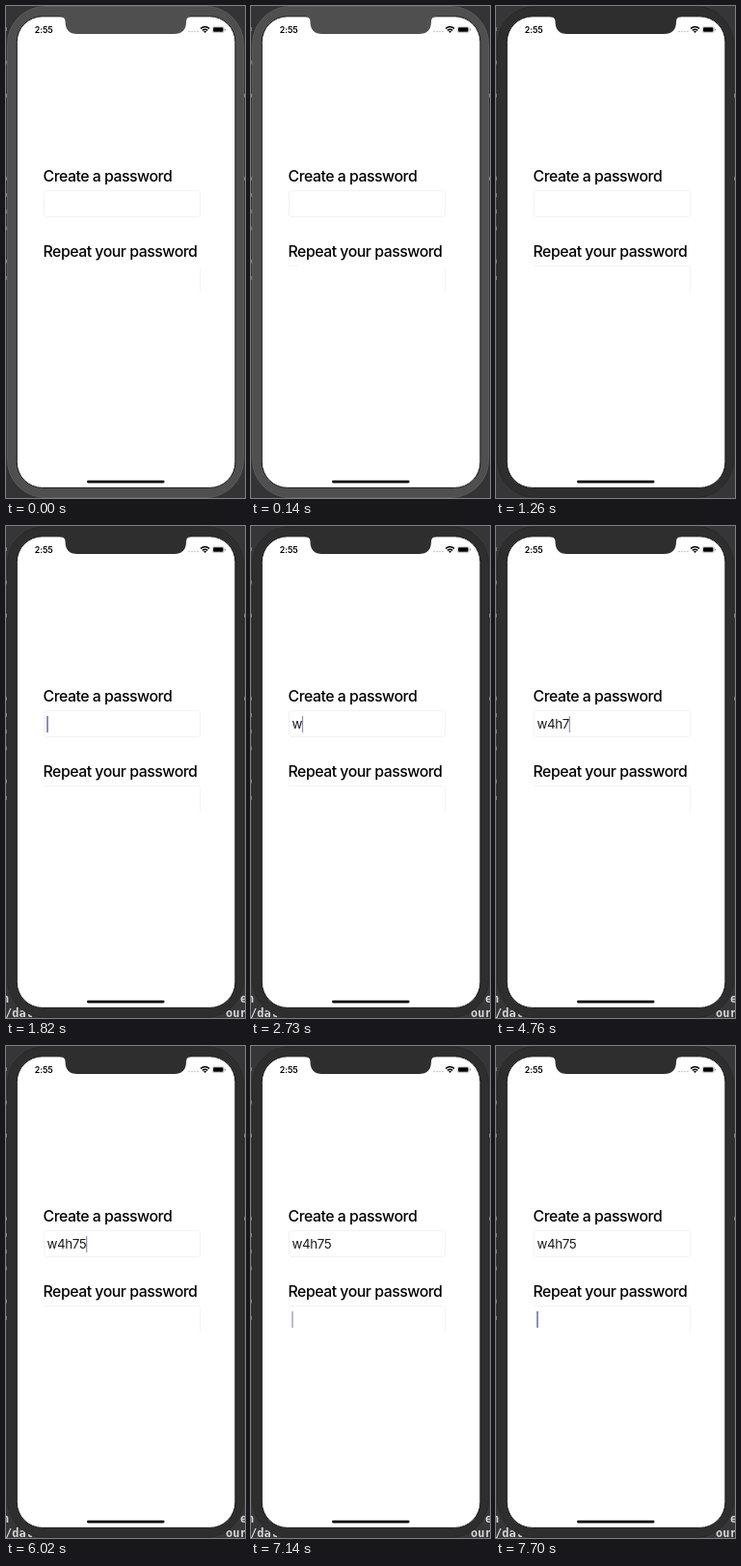
An HTML page that plays this animation: 248 px wide and 510 px high, repeating every 8000 ms.

```html
<!DOCTYPE html>
<html lang="en">
<head>
<meta charset="utf-8">
<title>Password form</title>
<style>
  html, body { margin: 0; width: 100%; height: 100%; overflow: hidden; background: #333336; }
  svg { display: block; width: 248px; height: 510px; }
  text { font-family: Inter, "Liberation Sans", sans-serif; white-space: pre; }
  .label { font-size: 15.8px; font-weight: 500; letter-spacing: -.46px; }
  .entry { font-size: 13.4px; letter-spacing: -.45px; fill: #1c1c1c; }
  .clock { font-size: 8.8px; font-weight: 600; letter-spacing: -.1px; }
  #code text { font: bold 12px "DejaVu Sans Mono", monospace; fill: #d4d4d4; }
  .line { fill: none; stroke: #f2f2f2; }
</style>
</head>
<body>
<svg viewBox="0 0 248 510">
  <rect id="desk" width="248" height="510"/>
  <g id="specks" fill="#777"></g>
  <g id="code">
    <text x="-4" y="494">n</text>
    <text x="243" y="494">e</text>
    <text x="-1" y="509">/dat</text>
    <text x="228" y="509">our</text>
  </g>
  <rect id="body" x="1.5" y=".5" width="245" height="509" rx="39"/>
  <rect x="11.300" y="10.800" width="226.600" height="488.600" rx="26.500" fill="#fff" stroke="#1a1a1a"/>
  <path id="notch" d="M56 10H192V11.300Q187 11.300 187 16Q187 29 174 29H74Q61.500 29 61.500 16Q61.500 11.300 56 11.300Z"/>

  <text class="clock" x="29.800" y="27.500">2:55</text>
  <path d="M190 26.500H200" stroke="#b5b5b5" stroke-width="1.600" stroke-linecap="round" stroke-dasharray="0 3"/>
  <g fill="none" stroke="#000" stroke-width="1.500">
    <path d="M202 23.300Q206.500 19.700 211 23.300"/>
    <path d="M203.800 25.300Q206.500 23.200 209.200 25.300"/>
  </g>
  <path d="M205 26.300Q206.500 25.300 208 26.300L206.500 28Z"/>
  <rect x="214.200" y="21.400" width="12" height="6.200" rx="1.800" fill="#fff" stroke="#aaa" stroke-width=".6"/>
  <rect x="215" y="22.200" width="10.400" height="4.600" rx="1.100"/>
  <rect x="227" y="23.600" width="1" height="2" rx=".5" fill="#999"/>

  <text class="label" x="38.500" y="182">Create a password</text>
  <text class="label" x="38.500" y="260">Repeat your password</text>
  <rect class="line" x="39.500" y="191.500" width="162" height="27" rx="3"/>
  <path class="line" d="M201.500 272V296"/>
  <path id="top" class="line" d="M39.500 269.500H199Q201.500 269.500 201.500 272" pathLength="1"/>
  <text id="entry" class="entry" x="42.500" y="210"></text>
  <rect id="caret" width="1.200" height="17" fill="#43458c"/>
  <rect x="84" y="491.800" width="80.500" height="2.600" rx="1.300"/>
</svg>
<script>
const LOOP = 8000, STEP = 70;
const WORD = "w4h75";
const KEYS = [2100, 2800, 3360, 4130, 4900];
const FOCUS = 1820, NEXT = 6510, DARK = 1260;
const WAKES = [FOCUS, ...KEYS, NEXT];
const FIELD_GAP = 78, LINE_GAP = 17.2;

const $ = id => document.getElementById(id);
const set = (id, attrs) => {
  for (const k in attrs) $(id).setAttribute(k, attrs[k]);
};

// ends of text lines that show beside the phone
const speck = (x, row) => `<rect x="${x}" y="${22 + row * LINE_GAP}" width="1" height="4"/>`;
$("specks").innerHTML =
  [0, 2, 4, 9, 10, 11, 12, 14, 15].map(row => speck(0, row)).join("") +
  [4, 9].map(row => speck(247, row)).join("");

// Solid after each keystroke, then a soft blink
function caretOpacity(t) {
  const wake = WAKES.findLast(w => w <= t);
  if (wake === undefined) return 0;
  const age = t - wake, phase = age % (16 * STEP);
  if (phase < 9 * STEP) return age > phase && phase < STEP ? .6 : 1;
  return phase < 10 * STEP ? .6 : 0;
}

function draw(t) {
  const dark = t >= DARK, second = t >= NEXT;
  const shell = dark ? "#2e2e2e" : "#4f4f4f";
  const entry = $("entry");
  const text = WORD.slice(0, KEYS.filter(k => k <= t).length);
  if (entry.textContent !== text) entry.textContent = text;
  const typed = text && !second ? entry.getComputedTextLength() : 0;

  set("caret", {
    x: 42.4 + typed,
    y: 197 + (second ? FIELD_GAP : 0),
    opacity: caretOpacity(t)
  });
  set("body", { fill: shell, stroke: dark ? "#292929" : "#5a5a5a" });
  set("notch", { fill: shell });
  set("desk", { fill: dark ? "#363638" : "#343436" });
  set("code", { opacity: t < 1470 ? 0 : t < 1610 ? .5 : 1 });
  set("top", { "stroke-dasharray": `${dark ? 1 : t < 2 * STEP ? 0 : .06} 2` });
}

const start = performance.now();
function tick() {
  draw((performance.now() - start) % LOOP);
  requestAnimationFrame(tick);
}
tick();
</script>
</body>
</html>
```
